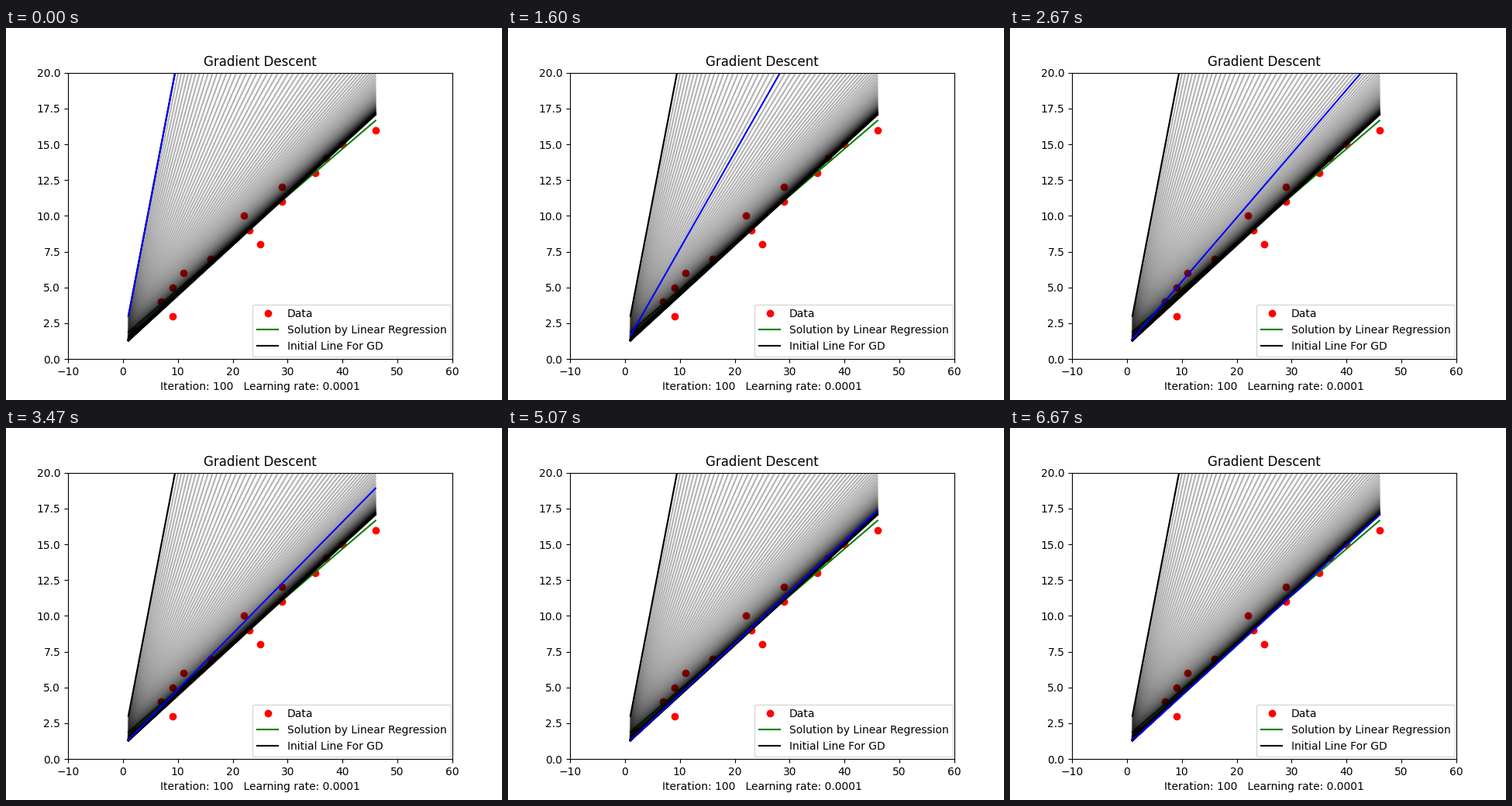
A matplotlib script that plays this animation: 640 by 480 pixels, repeating every 6740 ms.

```python
import numpy as np
import matplotlib.pyplot as plt
from matplotlib.animation import FuncAnimation

LOOP_MS = 6740
ITERATIONS = 100
RATE = 0.0001

x = np.array([2, 9, 7, 9, 11, 16, 25, 23, 22, 29, 29, 35, 37, 40, 46], float)
y = np.arange(2, 17, dtype=float)
A = np.column_stack([np.ones_like(x), x])
ends = np.array([1.0, 46.0])


def line_at(w):
    """Heights of the line with weights (intercept, slope) at both ends."""
    return w[0] + w[1] * ends


def descend(w):
    """All weights visited by gradient descent, the start included."""
    path = [w]
    for _ in range(ITERATIONS):
        w = w - RATE * A.T @ (A @ w - y) / len(x)
        path.append(w)
    return path


best = np.linalg.lstsq(A, y, rcond=None)[0]
path = descend(np.array([1.0, 2.0]))

fig = plt.figure(figsize=(6.4, 4.8), dpi=100)
ax = fig.add_subplot(xlim=(-10, 60), ylim=(0, 20))
ax.plot(x, y, "ro", label="Data")
ax.plot(ends, line_at(best), color="green", label="Solution by Linear Regression")
ax.plot(ends, line_at(path[0]), color="black", label="Initial Line For GD")
for w in path:
    ax.plot(ends, line_at(w), color="black", alpha=0.3)
current, = ax.plot(ends, line_at(path[0]), color="blue")

ax.legend(loc=(0.48, 0.01))
ax.set_title("Gradient Descent")
ax.set_xlabel(f"Iteration: {ITERATIONS}   Learning rate: {RATE}")


def update(i):
    current.set_data(ends, line_at(path[i]))
    return current,


anim = FuncAnimation(fig, update, frames=len(path),
                     interval=LOOP_MS / len(path), repeat=True, repeat_delay=0)
plt.show()
```
